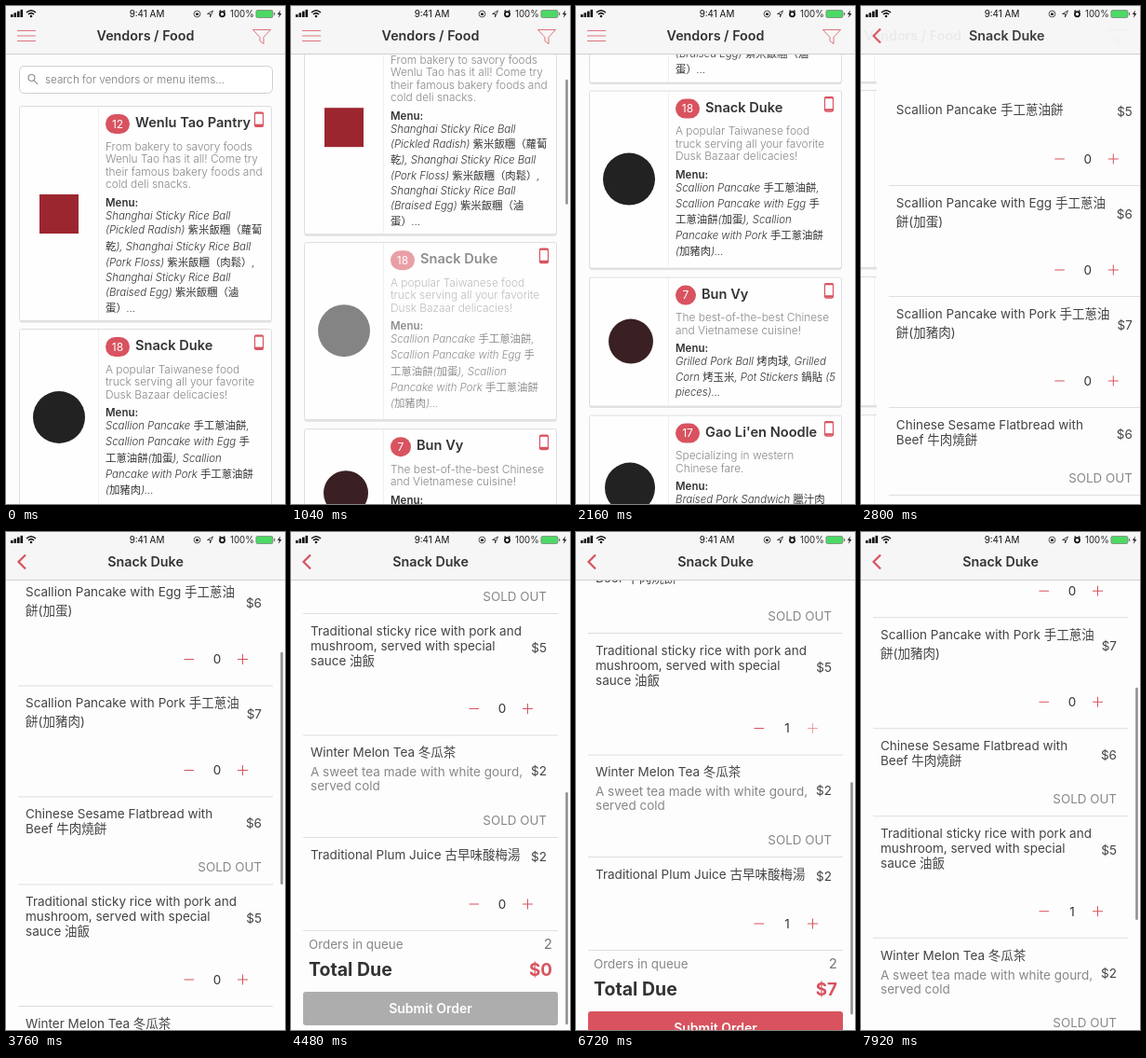
Recreate the animation shown at these times as an HTML page. Size 300 px wide and 534 px high, loop 8 s.

```html
<!DOCTYPE html>
<html lang="zh-Hant">
<head>
<meta charset="utf-8">
<title>Food ordering</title>
<style>
  html, body { margin: 0; width: 100%; height: 100%; overflow: hidden; background: #fcfcfc; }
  svg { display: block; width: 100vw; height: 100vh; }
  text { font-family: Inter, "Noto Sans CJK TC", "Noto Sans CJK SC", "Noto Sans CJK JP", sans-serif; white-space: pre; }
</style>
</head>
<body>
<svg id="stage" viewBox="0 0 300 534"></svg>
<script>
const LOOP = 8000, RED = '#d8535f', DARK = '#333', GREY = '#888';
const CJK = /[\u3000-\u9fff\uff00-\uffef]+/g;
const VENDOR = 'Snack Duke';

const hasCJK = str => str.search(CJK) >= 0;

// y is the optical middle of the line
function text(str, x, y, size, { fill = DARK, weight = 400, anchor = 'start', italic = false, id = '' } = {}) {
  const body = italic ? str.replace(CJK, '<tspan font-style="normal">$&</tspan>') : str;
  return `<text ${id && `id="${id}"`} x="${x}" y="${y + size * 0.36}" font-size="${size}" fill="${fill}"
    font-weight="${weight}" text-anchor="${anchor}" font-style="${italic ? 'italic' : 'normal'}">${body}</text>`;
}
const rect = (x, y, w, h, fill, extra = '') =>
  `<rect x="${x}" y="${y}" width="${w}" height="${h}" fill="${fill}" ${extra}/>`;
const line = (d, stroke, width = 1, extra = '') =>
  `<path d="${d}" fill="none" stroke="${stroke}" stroke-width="${width}" ${extra}/>`;

// ---- vendor list ----
const vendors = [
  { top: 107, height: 231, number: 12, name: 'Wenlu Tao Pantry', logo: rect(36, 202, 42, 42, '#9c2630'),
    about: ['From bakery to savory foods', 'Wenlu Tao has it all! Come try', 'their famous bakery foods and', 'cold deli snacks.'],
    menu: ['Shanghai Sticky Rice Ball', '(Pickled Radish) 紫米飯糰（蘿蔔', '乾), Shanghai Sticky Rice Ball',
      '(Pork Floss) 紫米飯糰（肉鬆）,', 'Shanghai Sticky Rice Ball', '(Braised Egg) 紫米飯糰（滷', '蛋）...'] },
  { top: 346, height: 191, number: 18, name: VENDOR, logo: '<circle cx="57" cy="441" r="28" fill="#222"/>',
    about: ['A popular Taiwanese food', 'truck serving all your favorite', 'Dusk Bazaar delicacies!'],
    menu: ['Scallion Pancake 手工蔥油餅,', 'Scallion Pancake with Egg 手', '工蔥油餅(加蛋), Scallion', 'Pancake with Pork 手工蔥油餅', '(加豬肉)...'] },
  { top: 546, height: 139, number: 7, name: 'Bun Vy', logo: '<circle cx="59" cy="615" r="24" fill="#3a2022"/>',
    about: ['The best-of-the-best Chinese', 'and Vietnamese cuisine!'],
    menu: ['Grilled Pork Ball 烤肉球, Grilled', 'Corn 烤玉米, Pot Stickers 鍋貼 (5', 'pieces)...'] },
  { top: 694, height: 160, number: 17, name: "Gao Li'en Noodle", logo: '<circle cx="58" cy="772" r="27" fill="#222"/>',
    about: ['Specializing in western', 'Chinese fare.'],
    menu: ['Braised Pork Sandwich 臘汁肉'] },
];

// Lines holding Chinese glyphs are taller than purely Latin ones
function menuLines(lines, y) {
  const height = s => hasCJK(s) ? 17.2 : 14.5;
  return lines.map((s, n) => {
    if (n) y += (height(lines[n - 1]) + height(s)) / 2;
    return text(s, 107, y, 11.4, { italic: true, weight: 300 });
  }).join('');
}

const phone = (x, y) => rect(x, y, 9, 15.5, 'none', `rx="1.5" stroke="${RED}" stroke-width="1.2"`)
  + line(`M${x} ${y + .8}h9`, RED, 1.8) + line(`M${x} ${y + 13.8}h9`, RED, 2.4);

function card({ top, height, number, name, logo, about, menu }, i) {
  const badge = number > 9 ? 26 : 22;
  const menuY = top + 49.5 + 13.5 * about.length;
  return rect(14.5, top + 1.5, 271, height, '#e2e2e2', 'rx="2"')
    + rect(14.5, top + .5, 271, height - 1, '#fefefe', 'rx="2" stroke="#dedede"')
    + line(`M99.5 ${top + 1}v${height - 2}`, '#f0f0f0')
    + `<g id="card${i}">${logo}`
    + rect(107, top + 9, badge, 21, RED, 'rx="10.5"')
    + text(number, 107 + badge / 2, top + 19.5, 12, { fill: '#fff', anchor: 'middle' })
    + text(name, 113 + badge, top + 18, 14.6, { weight: 600 })
    + about.map((s, n) => text(s, 107, top + 43.5 + 13.5 * n, 11.9, { fill: GREY, weight: 300 })).join('')
    + text('Menu:', 107, menuY, 11.5, { weight: 600 })
    + menuLines(menu, menuY + 14) + '</g>'
    + phone(267.5, top + 7);
}

const searchBox = rect(14.5, 64.5, 272, 29, '#fff', 'rx="5" stroke="#cfcfcf"')
  + '<circle cx="27.5" cy="77" r="3.6" fill="none" stroke="#777"/>' + line('M30 80l4 4', '#777')
  + text('search for vendors or menu items...', 42, 79, 11.7, { fill: '#777', weight: 300 });

// ---- order page ----
const FOOTER = 864;
const dishes = [
  { top: 92, price: 5, lines: ['Scallion Pancake 手工蔥油餅'] },
  { top: 192, price: 6, lines: ['Scallion Pancake with Egg 手工蔥油', '餅(加蛋)'] },
  { top: 311, price: 7, lines: ['Scallion Pancake with Pork 手工蔥油', '餅(加豬肉)'] },
  { top: 430, price: 6, lines: ['Chinese Sesame Flatbread with', 'Beef 牛肉燒餅'], soldOut: true },
  { top: 524, price: 5, lines: ['Traditional sticky rice with pork and', 'mushroom, served with special', 'sauce 油飯'], id: 'rice' },
  { top: 654.5, price: 2, lines: ['Winter Melon Tea 冬瓜茶'], soldOut: true,
    note: ['A sweet tea made with white gourd,', 'served cold'] },
  { top: 764, price: 2, lines: ['Traditional Plum Juice 古早味酸梅湯'], id: 'plum' },
];

function dish({ top, price, lines, note = [], soldOut, id = '' }, i) {
  const bottom = dishes[i + 1]?.top ?? FOOTER;
  const pitch = hasCJK(lines[0]) ? 20 : 16;
  const textSpan = note.length ? 35 : pitch * (lines.length - 1);
  const y = bottom - 28;
  const controls = soldOut
    ? text('SOLD OUT', 275, bottom - 18, 13.4, { fill: GREY, anchor: 'end' })
    : line(`M191.5 ${y}h10.5`, RED)
      + text('0', 227, y, 13.5, { anchor: 'middle', id: id && id + 'Count' })
      + line(`M249 ${y}h11M254.5 ${y - 5.5}v11`, RED, 1, id && `id="${id}Plus"`);
  return lines.map((s, n) => text(s, 21, top + 19 + pitch * n, 13.5, { fill: '#444' })).join('')
    + note.map((s, n) => text(s, 21, top + 40 + 15 * n, 13.5, { fill: GREY })).join('')
    + text('$' + price, 275, top + 21 + textSpan / 2, 13.5, { fill: '#444', anchor: 'end' })
    + controls + line(`M13 ${bottom + .5}h274`, '#dedede');
}

const footer = text('Orders in queue', 19, 879, 13.4, { fill: GREY })
  + text('2', 281, 879, 15, { fill: '#777', anchor: 'end' })
  + text('Total Due', 19, 906, 19.5, { weight: 700 })
  + text('$0', 281, 906, 18.8, { fill: RED, weight: 700, anchor: 'end', id: 'total' })
  + rect(13, 930, 274, 36, '#adadad', 'rx="3" id="submit"')
  + text('Submit Order', 150, 948, 14, { fill: '#fff', weight: 600, anchor: 'middle' });

// ---- bars ----
const statusBar = [0, 1, 2, 3].map(i => rect(5 + 3.5 * i, 9 - 1.7 * i, 2.6, 3 + 1.7 * i, '#111')).join('')
  + line('M22 7q5-4.6 10 0M23.9 9q3.1-2.8 6.2 0', '#111', 1.5) + '<circle cx="27" cy="11" r="1.3" fill="#111"/>'
  + text('9:41 AM', 151.5, 8.5, 9.9, { fill: '#111', anchor: 'middle' })
  + '<circle cx="205.5" cy="8.5" r="3.4" fill="none" stroke="#222" stroke-width=".8"/>' + rect(204, 7.5, 3, 2.4, '#222')
  + '<path d="M222.5 5l-6 3.5h3v3.5z" fill="none" stroke="#222" stroke-width=".8"/>'
  + '<circle cx="232.5" cy="8.8" r="2.6" fill="none" stroke="#111" stroke-width="1.7"/>'
  + line('M229.5 5.8l1.3-1.3M235.5 5.8l-1.3-1.3', '#111', 1.1)
  + text('100%', 241, 8.5, 9.7, { fill: '#222' })
  + rect(268.9, 4.5, 18, 8, '#4cd964', 'rx="1.5" stroke="#777" stroke-width=".7"') + rect(287.9, 7, 1.3, 3, '#777')
  + '<path d="M295 4.5l-3.2 4.6h2l-.9 3.6 3.5-4.8h-2.1z" fill="#222"/>';

const title = (s, id) => text(s, 150, 31.5, 14.3, { weight: 600, anchor: 'middle', id });
const header = rect(0, 0, 300, 51, '#f6f6f6') + rect(0, 51, 300, 1, '#cfcfcf') + statusBar
  + '<g id="listHeader">' + title('Vendors / Food', 'listTitle')
  + line('M12 26.5h20M12 32h20M12 37.5h20', RED, .8)
  + line('M265.5 25.5h19l-7.5 8v7l-4-3v-4z', RED, .8) + '</g>'
  + '<g id="orderHeader">' + title(VENDOR, 'orderTitle')
  + line('M21 24.5l-7.5 7.5 7.5 7.5', RED, 2.2) + '</g>';

const bar = id => rect(295.2, 53, 2.6, 0, '#909090', `rx="1.3" id="${id}"`);
document.getElementById('stage').innerHTML = rect(0, 0, 300, 534, '#fcfcfc')
  + `<g id="list"><g id="listScroll">${searchBox}${vendors.map(card).join('')}</g>${bar('listBar')}</g>`
  + `<g id="order">${rect(0, 0, 300, 534, '#fdfdfd')}<g id="orderScroll">${dishes.map(dish).join('')}${footer}</g>${bar('orderBar')}</g>`
  + header;

// ---- motion ----
const el = id => document.getElementById(id);
const set = (id, name, value) => el(id).setAttribute(name, value);
const ramp = (t, a, b) => Math.min(1, Math.max(0, (t - a) / (b - a)));
const smooth = u => u * u * (3 - 2 * u);
const pulse = (t, inA, inB, outA, outB) => ramp(t, inA, inB) - ramp(t, outA, outB);

// A drag from 0 to `released`, then an exponential glide to `end`
function flick(t, start, release, released, end, tau, power) {
  if (t < release) return released * ramp(t, start, release) ** power;
  return end - (end - released) * Math.exp((release - t) / tau);
}

function orderScroll(t) {
  if (t < 6000) return flick(t, 3560, 3760, 145, 445, 199, 2);
  if (t < 7300) return 445 - 29 * smooth(ramp(t, 6080, 6480));
  return 416 + flick(t, 7360, 7600, -76, -216, 164, 1.5);
}

function scroll(id, y, contentHeight, opacity) {
  const scale = 482 / contentHeight;
  set(id + 'Scroll', 'transform', `translate(0 ${-y})`);
  set(id + 'Bar', 'y', 53 + y * scale);
  set(id + 'Bar', 'height', 482 * scale);
  set(id + 'Bar', 'opacity', opacity);
}

function render(t) {
  scroll('list', flick(t, 900, 1040, 92, 256, 200, 1.3), 1734, pulse(t, 900, 980, 1900, 2160));
  scroll('order', orderScroll(t), 932,
    pulse(t, 3520, 3600, 5200, 5440) + pulse(t, 6040, 6120, 6720, 6960) + ramp(t, 7320, 7400));
  set('card1', 'opacity', 1 - .45 * (pulse(t, 820, 920, 1120, 1360) + pulse(t, 2300, 2400, 2600, 2800)));

  const push = 1 - (1 - ramp(t, 2480, 3000)) ** 3;
  set('list', 'transform', `translate(${-90 * push} 0)`);
  set('order', 'transform', `translate(${300 * (1 - push)} 0)`);
  set('listHeader', 'opacity', 1 - push);
  set('orderHeader', 'opacity', push);
  set('listTitle', 'transform', `translate(${-100 * push} 0)`);
  set('orderTitle', 'transform', `translate(${120 * (1 - push)} 0)`);

  const plum = +(t >= 6000), rice = +(t >= 6640), total = 2 * plum + 5 * rice;
  set('plumPlus', 'opacity', 1 - .8 * pulse(t, 5660, 5800, 6000, 6200));
  set('ricePlus', 'opacity', 1 - .8 * pulse(t, 6480, 6600, 6640, 6840));
  el('plumCount').textContent = plum;
  el('riceCount').textContent = rice;
  el('total').textContent = '$' + total;
  set('submit', 'fill', total ? RED : '#adadad');
}

function tick() {
  render(performance.now() % LOOP);
  requestAnimationFrame(tick);
}
tick();
</script>
</body>
</html>
```
